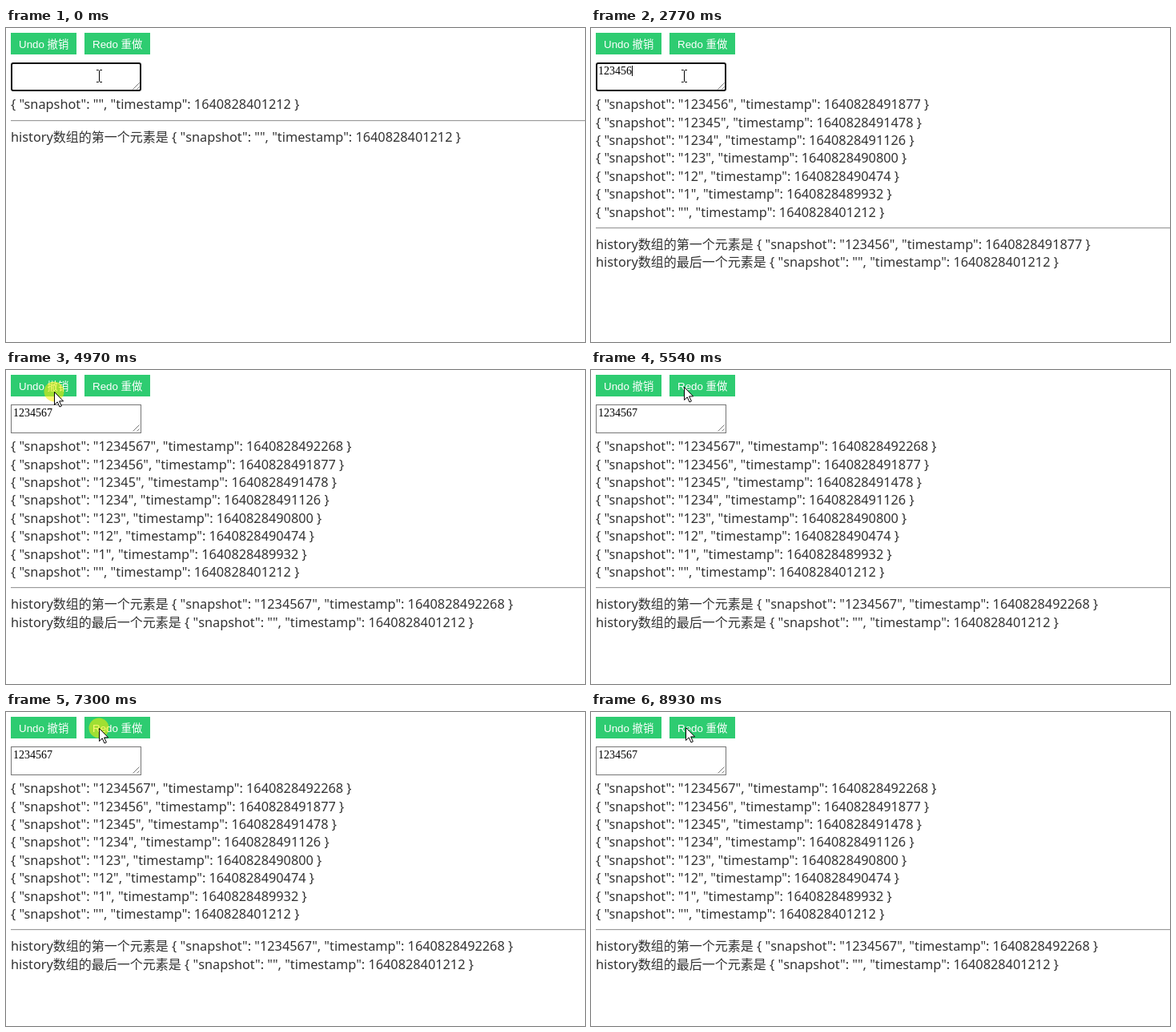
An HTML page that plays this animation: 723x392 px, repeating every 9.45 s.

```html
<!DOCTYPE html>
<html lang="zh">
<head>
<meta charset="utf-8">
<title>Undo / Redo</title>
<style>
  html, body { margin: 0; width: 100%; height: 100%; overflow: hidden; background: #fff; }
  svg { display: block; }
  .body { font: 16.3px "Noto Sans", "Open Sans", "Noto Sans CJK SC", sans-serif; fill: #333; }
  .cjk { font: 16px "Noto Sans CJK SC", "Noto Sans CJK", sans-serif; }
  .btn { font: 13.333px "Liberation Sans", "Noto Sans CJK SC", "Noto Sans CJK", sans-serif; fill: #fff; }
  .field { font: 14px "Liberation Serif", serif; fill: #000; }
</style>
</head>
<body>
<svg id="stage" width="723" height="392" viewBox="0 0 723 392">
  <rect width="723" height="392" fill="#fff"/>
  <g fill="#2ecc71">
    <rect x="6" y="6" width="82" height="27"/>
    <rect x="98" y="6" width="82" height="27"/>
  </g>
  <text class="btn" x="16" y="25">Undo 撤销</text>
  <text class="btn" x="108" y="25">Redo 重做</text>

  <rect id="box" fill="#fff"/>
  <path d="M158.5 76.5l8-8M163.5 76.5l3-3" stroke="#777" fill="none"/>
  <text id="typed" class="field" y="58"/>
  <rect id="caret" y="47" width="1" height="13"/>

  <g id="rows" class="body"></g>
  <g id="rule">
    <rect x="6" width="717" height="1" fill="#9a9a9a"/>
    <rect x="6" y="1" width="717" height="1" fill="#eee"/>
  </g>
  <text id="first" class="body" x="6"><tspan>history</tspan><tspan class="cjk">数组的第一个元素是</tspan><tspan class="json"></tspan></text>
  <text id="last" class="body" x="6"><tspan>history</tspan><tspan class="cjk">数组的最后一个元素是</tspan><tspan class="json"></tspan></text>

  <circle id="glow" r="12.5" fill="#ffee00" fill-opacity=".55"/>
  <path id="beam" d="M-3.5 -7.5h2.5l1 1l1 -1h2.5M0 -6.5v13M-3.5 7.5h2.5l1 -1l1 1h2.5" fill="none" stroke="#000"/>
  <path id="arrow" d="M.5 .5v16l3.7 -3.6l2.8 6.1l2.4 -1.1l-2.8 -6h5z" fill="#fff" stroke="#000"/>
</svg>
<script>
const LOOP = 9450, LINE = 22.4;
const $ = id => document.getElementById(id);
const set = (el, attrs) => { for (const k in attrs) el.setAttribute(k, attrs[k]); };
const show = (el, on) => el.setAttribute('visibility', on ? 'visible' : 'hidden');

// Last six digits of each snapshot's time
const stamps = [401212, 489932, 490474, 490800, 491126, 491478, 491877, 492268, 492603];
const record = n => `{ "snapshot": "${'12345678'.slice(0, n)}", "timestamp": 1640828${stamps[n]} }`;

const typing = [750, 1410, 1720, 2050, 2380, 2770, 3160, 3470];
// Mouse down, mouse up, change of history
const clicks = [
  [4270, 4350, -1], [4970, 5070, -1], [5450, 5540, 1], [5970, 6060, 1],
  [6530, 6590, -1], [6660, 6720, -1], [7060, 7130, 1], [7250, 7330, 1],
  [7880, 7950, -1], [8020, 8100, -1], [8830, 8930, 1]
];
// Start, end, target x, y
const moves = [
  [3670, 4010, 60, 27], [5100, 5420, 116, 21], [6170, 6500, 66, 21],
  [6740, 7010, 116, 20], [7540, 7850, 69, 22], [8310, 8720, 118, 19]
];
const nudges = [[240, 122, 62], [355, 119, 61], [470, 116, 60]];

const lines = stamps.map((_, i) => {
  const el = document.createElementNS('http://www.w3.org/2000/svg', 'text');
  set(el, { x: 6, y: Math.round(101.2 + LINE * i) });
  return $('rows').appendChild(el);
});

function pointer(t) {
  let x = 116, y = 60;
  for (const [at, nx, ny] of nudges) if (t >= at) { x = nx; y = ny; }
  for (const [from, to, tx, ty] of moves) {
    const p = Math.min(1, Math.max(0, (t - from) / (to - from)));
    const e = p * p * (3 - 2 * p);
    x += (tx - x) * e;
    y += (ty - y) * e;
  }
  return [Math.round(x), Math.round(y)];
}

let shown = -1;
function showHistory(n) {
  if (n === shown) return;
  shown = n;
  lines.forEach((el, i) => { el.textContent = i <= n ? record(n - i) : ''; });
  const ruleY = 92.6 + LINE * (n + 1);
  set($('rule'), { transform: `translate(0 ${Math.floor(ruleY)})` });
  [['first', n], ['last', 0]].forEach(([id, item], i) => {
    const el = $(id);
    set(el, { y: Math.round(ruleY + 26.5 + LINE * i) });
    el.querySelector('.json').textContent = ' ' + record(item);
  });
  show($('last'), n > 0);
}

function draw(t) {
  const keys = typing.filter(at => t >= at).length;
  const size = clicks.reduce((n, [, up, step]) => t >= up ? n + step : n, keys);
  showHistory(t < 870 ? 0 : size);

  const focus = t < clicks[0][0];
  const inset = focus ? 1 : 0.5;
  set($('box'), {
    x: 6 + inset, y: 43 + inset, width: 163 - 2 * inset, height: 36 - 2 * inset,
    rx: focus ? 2 : 0, stroke: focus ? '#101010' : '#767676', 'stroke-width': 2 * inset
  });
  const typed = '12345678'.slice(0, size);
  if ($('typed').textContent !== typed) $('typed').textContent = typed;
  set($('typed'), { x: 9 });
  set($('caret'), { x: 9 + 7 * size });
  show($('caret'), focus && t >= 470);

  const [x, y] = pointer(t), place = { transform: `translate(${x} ${y})` };
  const inField = y >= 43;
  set($('arrow'), place);
  set($('beam'), { transform: `translate(${x + 0.5} ${y})` });
  set($('glow'), place);
  show($('arrow'), !inField);
  show($('beam'), inField);
  show($('glow'), clicks.some(([down, up]) => t >= down && t < up));
}

const start = performance.now();
function tick() {
  draw((performance.now() - start) % LOOP);
  requestAnimationFrame(tick);
}
tick();
</script>
</body>
</html>
```
